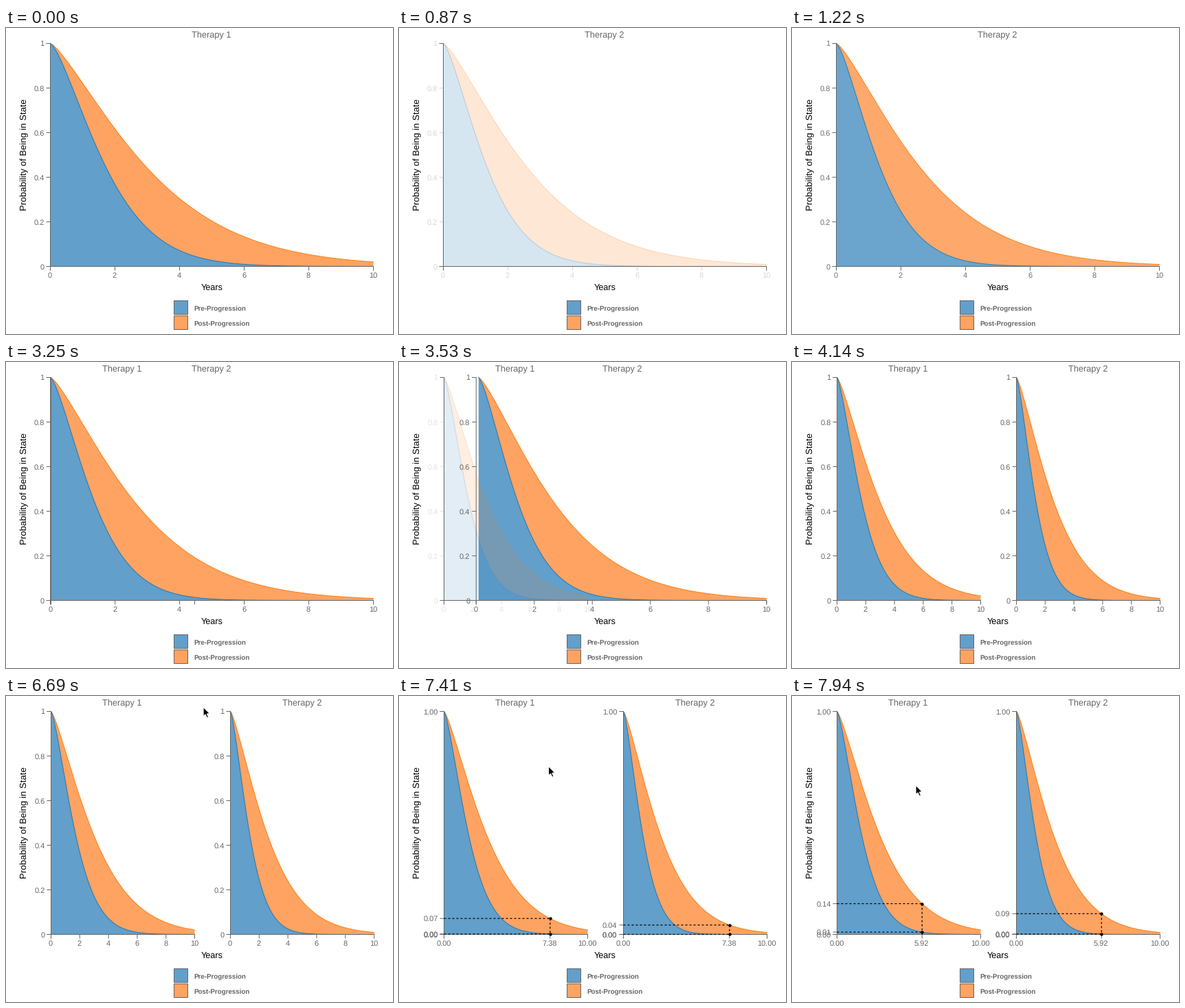
A matplotlib script that plays this animation: 563 by 446 pixels, repeating every 8 s.

```python
import numpy as np
import matplotlib
import matplotlib.pyplot as plt
from matplotlib.animation import FuncAnimation
from matplotlib.collections import LineCollection
from matplotlib.patches import Polygon, Rectangle

matplotlib.rcParams["font.family"] = "Liberation Sans"
matplotlib.rcParams["text.hinting"] = "none"
matplotlib.rcParams["path.snap"] = False

W, H, DPI = 563, 446, 64
PX = 72 / DPI                      # points per pixel
LOOP, STEP = 8000, 20

BLUE, ORANGE, GRAY = "#1f77b4", "#ff7f0e", "#666666"
ORANGE_FILL = "#ff7c1f"
TOP, BASE = 22.5, 347.5
FULL_X, FULL_W = 64.5, 470
LEFT_X, RIGHT_X, HALF_W = 65.5, 326.5, 209
YEARS = np.linspace(0, 10, 160)

FADE_START, FADE_TIME = 467, 1000
SPLIT_START, SPLIT_TIME = 3200, 920
ENTER_AT, SPLIT_AT, POINTER_AT = 480, 3250, 6690

# Moments at which the picture is refreshed
TICKS = np.concatenate([
    [0, ENTER_AT], np.linspace(750, 1220, 9),
    [SPLIT_AT], np.linspace(3300, 3700, 8), np.linspace(3790, 4140, 7),
    np.linspace(POINTER_AT, 6990, 6), np.linspace(7290, 7940, 12)])

# Pointer path and the hover position that trails it
PATH_T = [6690, 6990, 7230, 7940]
PATH_X = [287, 230, 230, 180]
PATH_Y = [16, 93, 93, 130]
HOVER_X = [296, 230, 230, 189.23]

ARROW = np.array([(0, 0), (0, 13.8), (3.1, 10.9), (5.3, 16), (7.6, 15),
                  (5.4, 10), (9.6, 9.8)])

fig = plt.figure(figsize=(W / DPI, H / DPI), dpi=DPI, facecolor="white")
ax = fig.add_axes([0, 0, 1, 1])
ax.set_xlim(0, W)
ax.set_ylim(H, 0)
ax.axis("off")

parts = []
shown = None


def ease(u):
    u = min(max(u, 0), 1)
    return 4 * u ** 3 if u < 0.5 else 1 - 4 * (1 - u) ** 3


def mix(a, b, p):
    return a + (b - a) * p


def survival(t, scale, shape, hazard):
    return np.exp(-hazard * (t / scale) ** shape)


def curves(therapy, t):
    """Share still pre-progression and share still alive."""
    h_pre, h_all = (1, 1) if therapy == 1 else (1.4, 1.2)
    return survival(t, 2, 1.4, h_pre), survival(t, 3.5, 1.3, h_all)


def to_y(p):
    return BASE - p * (BASE - TOP)


def keep(artist):
    parts.append(artist)
    return artist


def text(x, y, s, size, color=GRAY, **kw):
    kw.setdefault("ha", "center")
    return ax.text(x, y, s, fontsize=size * PX, color=color,
                   va="baseline", **kw)


def segments(segs, alpha=1.0, **kw):
    kw = {"colors": GRAY, "linewidths": PX, **kw}
    keep(ax.add_collection(LineCollection(segs, alpha=alpha, **kw),
                           autolim=False))


def draw_areas(therapy, x0, width, alpha, z):
    x = x0 + YEARS / 10 * width
    pre, alive = (to_y(c) for c in curves(therapy, YEARS))
    floor = np.full_like(x, BASE)
    for low, high, color in ((floor, pre, BLUE), (pre, alive, ORANGE_FILL)):
        outline = np.concatenate([np.c_[x, high], np.c_[x, low][::-1]])
        keep(ax.add_patch(Polygon(outline, fc=color, lw=0,
                                  alpha=0.7 * alpha, zorder=z)))
    for y, color in ((alive, ORANGE), (pre, BLUE)):
        keep(ax.plot(x, y, color=color, lw=PX, alpha=alpha,
                     zorder=z + 0.1)[0])


def draw_axes(x0, width, x_ticks, y_ticks, fmt, alpha, z):
    x1 = x0 + width
    segments([[(x0 - 6, TOP), (x0, TOP), (x0, BASE), (x0 - 6, BASE)],
              [(x0, BASE + 6), (x0, BASE), (x1, BASE), (x1, BASE + 6)]],
             zorder=z + 0.2)
    marks = []
    for v in x_ticks:
        x = x0 + v / 10 * width
        marks.append([(x, BASE), (x, BASE + 6)])
        keep(text(x - 0.5, 364, fmt(v), 11, alpha=alpha, zorder=z + 0.3))
    for v in y_ticks:
        y = to_y(v)
        marks.append([(x0 - 6, y), (x0, y)])
        keep(text(x0 - 9, y + 4, fmt(v), 11, ha="right", alpha=alpha,
                  zorder=z + 0.3))
    segments(marks, alpha, zorder=z + 0.2)


def draw_hover(therapy, x0, width, year, z):
    x = x0 + year / 10 * width
    pre, alive = (to_y(c) for c in curves(therapy, year))
    segments([[(x0, alive), (x, alive)], [(x0, pre), (x, pre)],
              [(x, alive), (x, BASE)]], colors="black",
             linewidths=1.2 * PX, linestyles=[(0, (2.5, 2.5))], zorder=z)
    keep(ax.plot([x, x], [pre, alive], "o", color="black", ms=4.4 * PX,
                 mew=0, zorder=z + 0.1)[0])


def draw_panel(therapy, x0, width, title_x, alpha=1.0, year=None, z=2,
               area=None):
    draw_areas(therapy, *(area or (x0, width)), alpha, z)
    if year is None:
        draw_axes(x0, width, range(0, 11, 2), np.arange(6) / 5,
                  "{:.2g}".format, alpha, z)
    else:
        draw_axes(x0, width, (0, year, 10),
                  (0, *curves(therapy, year), 1), "{:.2f}".format, alpha, z)
        draw_hover(therapy, x0, width, year, z + 0.5)
    keep(text(title_x, 14.5, f"Therapy {therapy}", 12.7))


def draw_pointer(t):
    tip = np.interp(t, PATH_T, PATH_X), np.interp(t, PATH_T, PATH_Y)
    keep(ax.add_patch(Polygon(ARROW + tip, fc="black", ec="white",
                              lw=1.2 * PX, zorder=9)))


def split_span(p):
    return mix(FULL_X, RIGHT_X, p), mix(FULL_W, HALF_W, p)


def draw_scene(t):
    if t < ENTER_AT:
        draw_panel(1, FULL_X, FULL_W, 299)
    elif t < SPLIT_AT:
        draw_panel(2, FULL_X, FULL_W, 299, ease((t - FADE_START) / FADE_TIME))
    else:
        p = ease((t - SPLIT_START) / SPLIT_TIME)
        lead = ease((t + 8 - SPLIT_START) / SPLIT_TIME)
        year = None
        if t >= POINTER_AT:
            draw_pointer(t)
            hover = np.interp(t, PATH_T, HOVER_X) - LEFT_X
            year = hover / HALF_W * 10 if hover < HALF_W else None
        draw_panel(2, *split_span(p), mix(299, 430.5, lead), year=year,
                   area=split_span(lead))
        draw_panel(1, LEFT_X, HALF_W, 169.2, p, year, z=4)


def draw_static():
    text(299.5, 383, "Years", 12.6, "black")
    text(30.3, 184.3, "Probability of Being in State", 13.2, "black",
         rotation=90, rotation_mode="anchor")
    for y, color, name in ((397.5, BLUE, "Pre-Progression"),
                           (419.5, ORANGE_FILL, "Post-Progression")):
        ax.add_patch(Rectangle((244.5, y), 20, 20, fc=color, alpha=0.7, lw=0))
        ax.add_patch(Rectangle((244.5, y), 20, 20, fill=False, ec=GRAY,
                               lw=PX))
        text(273.3, y + 14.7, name, 9.75, ha="left", weight="bold")


def update(i):
    global shown
    now = i * STEP + STEP / 2
    t = TICKS[np.searchsorted(TICKS, now, side="right") - 1]
    if t != shown:
        while parts:
            parts.pop().remove()
        draw_scene(t)
        shown = t
    return parts


def reset():
    global shown
    shown = None
    return update(0)


draw_static()
anim = FuncAnimation(fig, update, frames=LOOP // STEP, init_func=reset,
                     interval=STEP, repeat=True, repeat_delay=0, blit=False)
plt.show()
```
